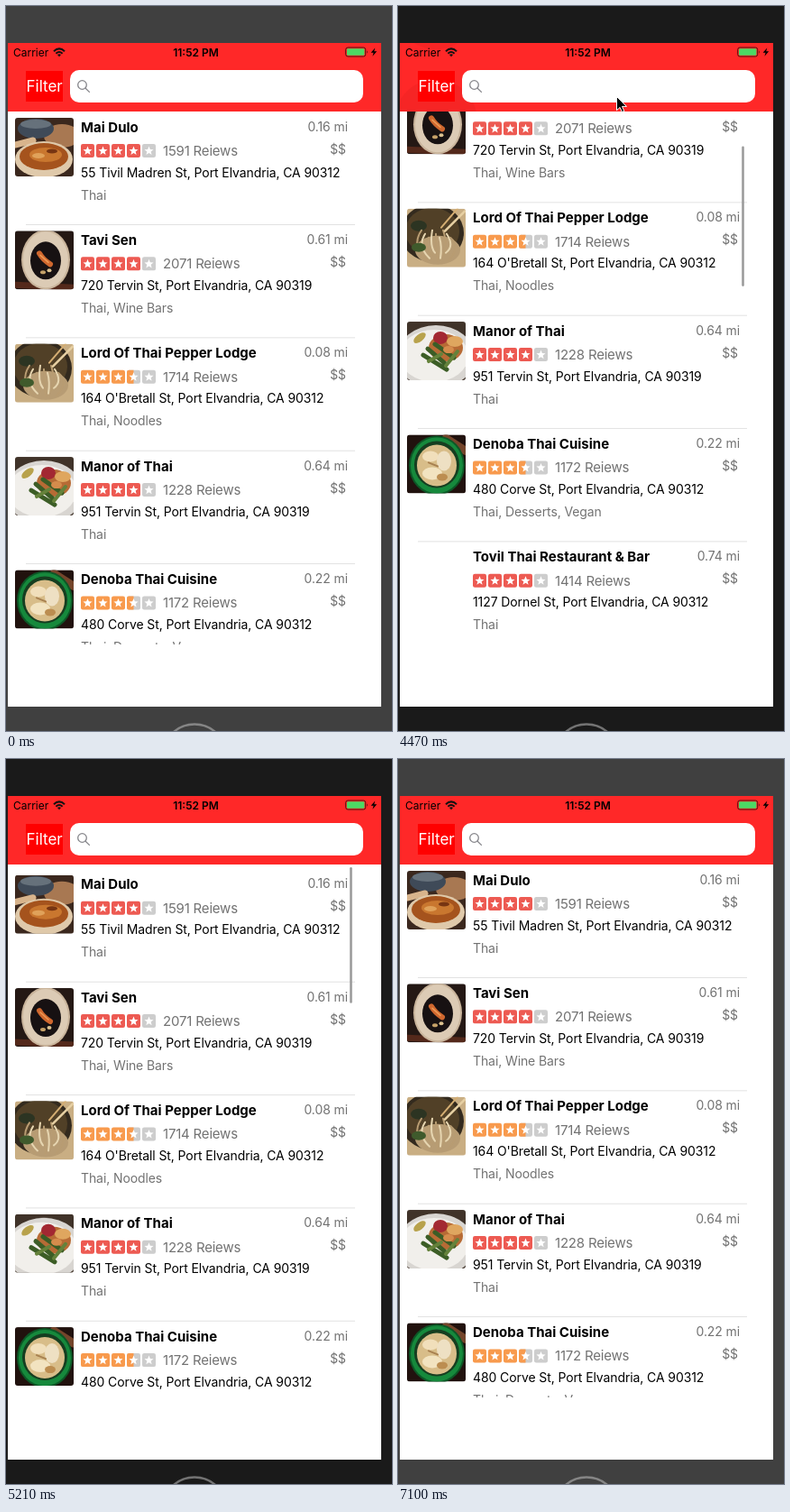
Write an HTML page that moves like this. It is 428 px wide and 804 px high and loops after 7200 ms.

```html
<!DOCTYPE html>
<html lang="en">
<head>
<meta charset="utf-8">
<title>Restaurant list</title>
<style>
html, body { margin: 0; width: 100%; height: 100%; overflow: hidden; background: #404040; }
svg { display: block; }
text { font-family: Inter, Roboto, sans-serif; font-size: 14px; letter-spacing: -.1px; fill: #000; }
.title { font-size: 15px; font-weight: 700; letter-spacing: 0; }
.count { font-size: 15px; letter-spacing: -.2px; }
.grey { fill: #727272; }
.end { text-anchor: end; }
.bar { font-size: 12px; letter-spacing: 0; }
</style>
</head>
<body>
<svg width="428" height="804" viewBox="0 0 428 804">
  <defs>
    <clipPath id="table"><rect x="2" y="117" width="414" height="591"/></clipPath>
    <clipPath id="head"><rect x="2" y="41" width="414" height="76"/></clipPath>
    <clipPath id="thumb"><rect width="65" height="65" rx="3"/></clipPath>
  </defs>
  <rect id="desk" width="428" height="804"/>
  <circle id="home" cx="209" cy="832" r="35.5" fill="none" stroke-width="2.5"/>
  <rect x="2" y="41" width="414" height="736" fill="#fff"/>
  <g clip-path="url(#table)"><g id="list"></g></g>
  <rect id="scroll" x="381.2" width="2.6" rx="1.3" fill="#9b9b9b"/>
  <rect x="2" y="41" width="414" height="76" fill="#ff2828"/>
  <g clip-path="url(#head)"><g id="ghosts" fill="#600" opacity=".05"></g></g>
  <text class="bar" x="8" y="56">Carrier</text>
  <g fill="none" stroke="#111" stroke-width="2">
    <path d="M53 50.2Q59 44.6 65 50.2M55.4 52.7Q59 49.4 62.6 52.7"/>
    <path d="M57 54L59 56.2 61 54Q59 52.4 57 54Z" fill="#111" stroke="none"/>
  </g>
  <text class="bar" x="210.5" y="56" text-anchor="middle" font-weight="600">11:52 PM</text>
  <rect x="376.7" y="46" width="22" height="10" rx="2.4" fill="none" stroke="#501010"/>
  <rect x="378" y="47.3" width="19.4" height="7.4" rx="1.2" fill="#4cd964"/>
  <path d="M400 49.2q1.8 1.8 0 3.6z" fill="#501010"/>
  <path d="M409.3 46.5L404.6 51.8H407.6L406.4 55.8 411.2 50.3H408.2Z"/>
  <rect x="22" y="72" width="41" height="34" fill="#f00"/>
  <text x="22.5" y="95" style="font-size:17px;letter-spacing:0;fill:#fff">Filter</text>
  <rect x="71" y="71" width="325" height="36" rx="10" fill="#fff"/>
  <g fill="none" stroke="#85858a" stroke-width="1.3" stroke-linecap="round">
    <circle cx="84.5" cy="87.5" r="4.8"/><path d="M88.2 91.2L92.4 95.4"/>
  </g>
  <path id="cursor" d="M0 0V15.2L3.6 11.9 5.9 17 8.3 16 6 10.9H11Z" stroke="#fff" stroke-width="1"/>
</svg>
<script>
const $ = id => document.getElementById(id);
const LOOP = 7200, TOP = 124, PITCH = 125.35, CITY = 'Port Elvandria, CA 9031';
const RED = '#ed5a52', ORANGE = '#f89a4d', EMPTY = '#cdcdcd';

// name, distance, rating, reviews, address, kind
const places = [
  ['Mai Dulo', '0.16', 4, 1591, '55 Tivil Madren St, ' + CITY + '2', 'Thai'],
  ['Tavi Sen', '0.61', 4, 2071, '720 Tervin St, ' + CITY + '9', 'Thai, Wine Bars'],
  ['Lord Of Thai Pepper Lodge', '0.08', 3.5, 1714, "164 O'Bretall St, " + CITY + '2', 'Thai, Noodles'],
  ['Manor of Thai', '0.64', 4, 1228, '951 Tervin St, ' + CITY + '9', 'Thai'],
  ['Denoba Thai Cuisine', '0.22', 3.5, 1172, '480 Corve St, ' + CITY + '2', 'Thai, Desserts, Vegan'],
  ['Tovil Thai Restaurant &amp; Bar', '0.74', 4, 1414, '1127 Dornel St, ' + CITY + '2', 'Thai']
];

const box = fill => `<rect width="65" height="65" fill="${fill}"/>`;
const oval = (x, y, rx, ry, fill, more = '') =>
  `<ellipse cx="${x}" cy="${y}" rx="${rx}" ry="${ry}" fill="${fill}" ${more}/>`;
const line = (d, color, width) =>
  `<path d="${d}" fill="none" stroke="${color}" stroke-width="${width}" stroke-linecap="round"/>`;

function noodles() {
  let s = '';
  for (let i = 0; i < 9; i++) {
    const x = 16 + i * 4, y = 24 + i % 3 * 4;
    s += line(`M${x} ${y}Q${x - 12 + i * 3} 42 ${x + 6 - i} ${58 - i % 4 * 3}`, i % 2 ? '#e6d5b0' : '#b89c72', 2);
  }
  return s;
}

const dishes = [
  box('#3b281e') + oval(52, 20, 20, 13, '#a87852') + oval(23, 12, 20, 11, '#3f4a58') +
    oval(23, 7, 17, 5, '#66717b') + line('M0 30L20 25', '#d8b48c', 7) +
    oval(32, 46, 32, 20, '#dfc9aa') + oval(32, 43, 27, 15, '#a5531d') +
    oval(34, 41, 18, 8, '#c9772f') + oval(26, 42, 7, 3, '#e0a25a') + oval(41, 37, 6, 2.5, '#783512'),
  box('#241814') + line('M0 60L65 63', '#54291b', 7) + oval(34, 32, 27, 33, '#c9b49b') +
    oval(34, 32, 25, 31, '#dccbb5') + oval(34, 33, 17, 21, '#171112') +
    line('M27 25Q31 32 39 37', '#cf672e', 6) + line('M28 27L37 35', '#ed9a54', 1.5) +
    oval(31, 46, 3, 2, '#c5a168') + oval(38, 44, 2.5, 2, '#dac18f'),
  box('#c9ae83') + oval(28, 27, 35, 32, '#332a1e') + oval(28, 25, 30, 26, '#514027') +
    oval(13, 19, 9, 6, '#2c3422') + oval(34, 46, 25, 16, '#b79c74') + noodles() +
    oval(13, 43, 8, 5, '#3f5a2c') + line('M64 3L42 25', '#e7d0a3', 2.5) + line('M56 0L38 21', '#d4ad72', 2),
  box('#403329') + oval(32, 39, 43, 35, '#d8d5d1') + oval(30, 38, 38, 29, '#f1efeb') +
    oval(14, 18, 8, 4, '#b8a24c', 'transform="rotate(-38 14 18)"') +
    oval(43, 29, 19, 15, '#b76b35') + oval(37, 18, 8, 7, '#a32832') + oval(53, 22, 9, 6, '#dfa65f') +
    line('M23 30L43 47M18 37L44 53M31 25L52 40', '#3c5d26', 5) +
    line('M24 44L38 36M43 49L56 33', '#65823b', 4) + oval(46, 31, 6, 4, '#d58c4c'),
  box('#21120e') + line('M43 4L65 18', '#74452b', 9) + oval(33, 34, 31, 33, '#0c5726') +
    oval(33, 34, 29, 31, '#16893c') + oval(33, 33, 25, 26, '#163e20') + oval(33, 34, 22, 23, '#d8bd89') +
    oval(26, 24, 9, 6, '#f1dfbb') + oval(41, 29, 8, 11, '#eee0c3') +
    oval(28, 43, 11, 7, '#f2e3c0') + oval(39, 47, 6, 4, '#bc8d50') + line('M24 31L34 35', '#a88150', 2)
];

const starPath = 'M' + Array.from({ length: 10 }, (_, i) => {
  const a = Math.PI * (i / 5 - .5), r = i % 2 ? 2.3 : 5.3;
  return (7.5 + r * Math.cos(a)).toFixed(2) + ' ' + (7.8 + r * Math.sin(a)).toFixed(2);
}).join('L') + 'Z';

function stars(rating) {
  const color = rating < 4 ? ORANGE : RED;
  let s = '';
  for (let i = 0; i < 5; i++) {
    const half = rating - i === .5;
    s += `<g transform="translate(${83 + i * 17} 29)">
      <rect width="15" height="15" rx="2.2" fill="${rating - i >= 1 ? color : EMPTY}"/>
      ${half ? `<path d="M7.5 0H2.2Q0 0 0 2.2V12.8Q0 15 2.2 15H7.5Z" fill="${color}"/>` : ''}
      <path d="${starPath}" fill="#fff"/></g>`;
  }
  return s;
}

const label = (cls, x, y, str) => `<text class="${cls}" x="${x}" y="${y}">${str}</text>`;

$('list').innerHTML = places.map(([name, miles, rating, count, address, kind], i) =>
  `<g transform="translate(0 ${TOP + i * PITCH})">` +
  (dishes[i] ? `<g transform="translate(10 0)" clip-path="url(#thumb)">${dishes[i]}</g>` : '') +
  label('title', 83, 15.5, name) + label('grey end', 379, 14.5, miles + ' mi') +
  stars(rating) + label('count grey', 174, 42, count + ' Reiews') +
  label('grey end', 377, 39.5, '$$') + label('', 83, 65.5, address) +
  label('grey', 83, 90.5, kind) +
  '<rect x="22" y="118" width="365" height="1" fill="#e2e2e2"/></g>').join('');

$('ghosts').innerHTML = places.slice(0, 2).map((_, i) =>
  `<circle cx="42" cy="${TOP + 28 + i * PITCH}" r="46"/>`).join('');

// start time, list offset, scroll bar opacity, pointer x and y
const steps = [
  [0, 0, 0],
  [3140, 0, 0, 257, 399],
  [3290, 0, 0, 257, 358],
  [3740, -15, 1, 255, 190],
  [3890, -87, 1, 250, 115],
  [4030, -135, 1, 245, 94],
  [4180, -150, 1, 242, 83],
  [4470, -150, 1, 242, 100],
  [4620, -25, 1, 243, 186],
  [4770, 62.5, 1],
  [4920, 56, 1],
  [5060, 19, 1],
  [5210, 4.7, 1],
  [5360, 1, 1],
  [5500, 0, .5],
  [5650, 0, 0],
  [5800, 0, 0, 324, 784],
  [5940, 0, 0, 398, 758],
  [6090, 0, 0]
];

function draw(now) {
  const t = now % LOOP;
  const [, offset, bar, x, y] = steps.filter(s => s[0] <= t).pop();
  const active = t >= 3740 && t < 7100;
  $('desk').setAttribute('fill', active ? '#1a1a1a' : '#404040');
  $('home').setAttribute('stroke', active ? '#737373' : '#858585');
  $('list').setAttribute('transform', `translate(0 ${offset})`);
  $('ghosts').setAttribute('transform', `translate(0 ${offset})`);
  $('ghosts').setAttribute('visibility', offset < -20 ? 'visible' : 'hidden');
  $('scroll').setAttribute('y', 120 + Math.max(0, -offset) * .236);
  $('scroll').setAttribute('height', 155.5 - Math.max(0, offset));
  $('scroll').setAttribute('opacity', bar);
  $('cursor').setAttribute('visibility', x ? 'visible' : 'hidden');
  if (x) $('cursor').setAttribute('transform', `translate(${x + .5} ${y + .5})`);
}

const start = performance.now();
function tick() {
  draw(performance.now() - start);
  requestAnimationFrame(tick);
}
tick();
</script>
</body>
</html>
```
